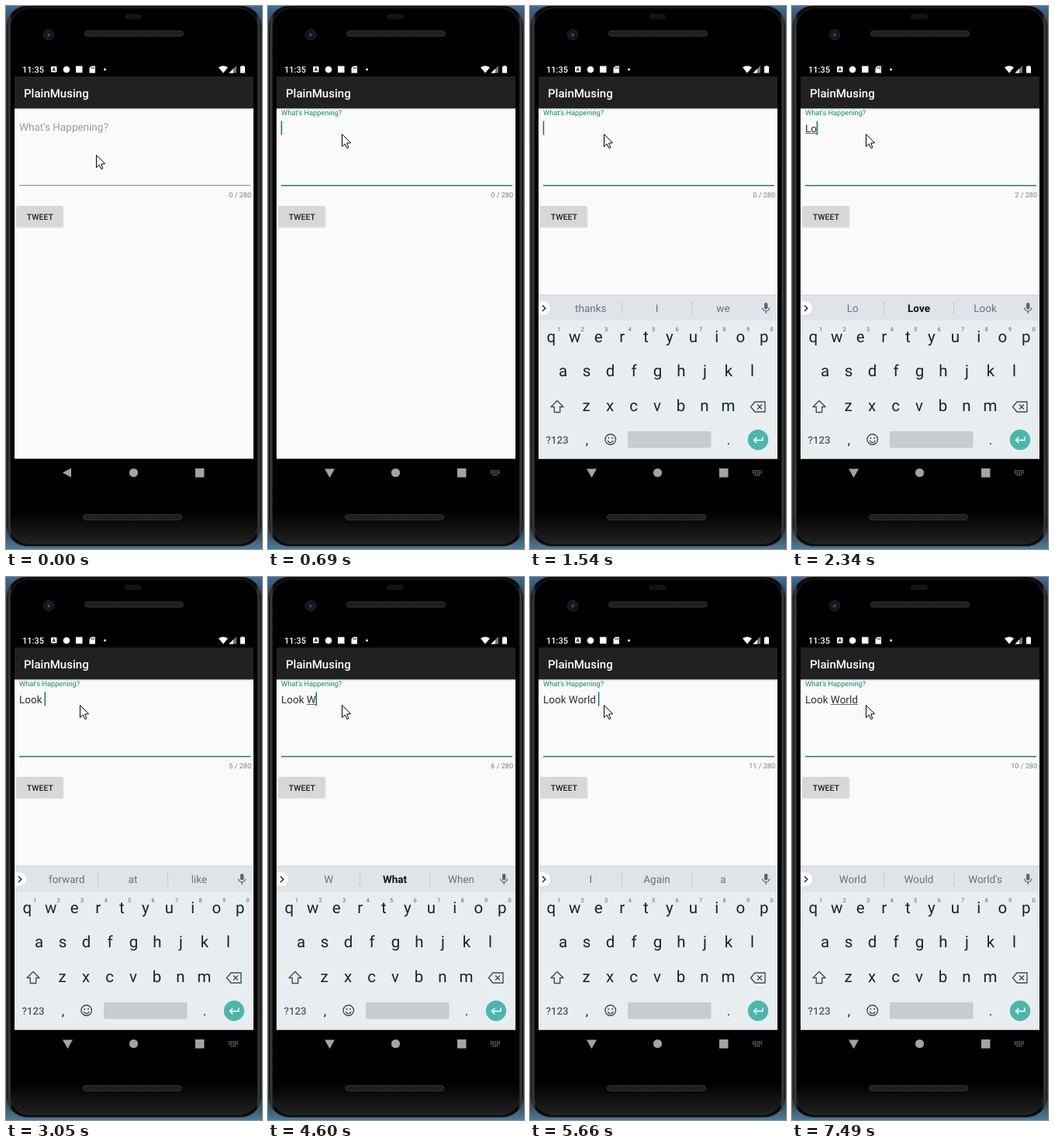
Animation, 330 px wide and 701 px high, one loop 8 s. Source, as an HTML page:

```html
<!DOCTYPE html>
<html lang="en">
<head>
<meta charset="utf-8">
<title>Compose screen</title>
<style>
html, body { margin: 0; width: 100%; height: 100%; overflow: hidden; background: #000; }
svg { display: block; width: 330px; height: 701px; font-family: Roboto, sans-serif; text-rendering: geometricPrecision; }
text { white-space: pre; }
.mid { text-anchor: middle; }
.key { font-size: 20.5px; fill: #14262d; }
.mark { font-size: 17px; fill: #14262d; }
.digit { font-size: 7.5px; fill: #56656b; }
.word { font-size: 13.5px; fill: #6a7378; }
.line { fill: none; stroke: #3f4d53; stroke-width: 1.4; }
</style>
</head>
<body>
<svg viewBox="0 0 330 701">
  <defs>
    <linearGradient id="sky" x2="0" y2="1">
      <stop offset="0" stop-color="#3b6d9c"/><stop offset=".06" stop-color="#25282b"/>
      <stop offset=".95" stop-color="#25282b"/><stop offset="1" stop-color="#4a7d9c"/>
    </linearGradient>
    <linearGradient id="rim">
      <stop offset="0" stop-color="#0c0d0e"/><stop offset=".012" stop-color="#3a3d3f"/>
      <stop offset=".022" stop-color="#0a0a0b"/><stop offset=".978" stop-color="#0a0a0b"/>
      <stop offset=".988" stop-color="#3a3d3f"/><stop offset="1" stop-color="#0c0d0e"/>
    </linearGradient>
    <linearGradient id="glass" x2="0" y2="1">
      <stop offset=".94" stop-color="#000"/><stop offset="1" stop-color="#222"/>
    </linearGradient>
    <pattern id="mesh" width="4" height="4" patternUnits="userSpaceOnUse">
      <rect width="4" height="4" fill="#242424"/><path d="M0 1h2M2 3h2" stroke="#101010"/>
    </pattern>
    <clipPath id="screen"><rect x="11" y="132" width="308" height="452.5"/></clipPath>
  </defs>

  <!-- phone -->
  <rect width="330" height="701" fill="url(#sky)"/>
  <rect x=".5" y="-.5" width="329" height="698" rx="27" fill="url(#rim)" stroke="#404447"/>
  <rect x="5.5" y="2.5" width="319" height="692" rx="25" fill="url(#glass)" stroke="#25272a"/>
  <rect x="153" y="10" width="22" height="7" rx="3.5" fill="#131313"/>
  <circle cx="55" cy="37" r="6.8" fill="#14161b" stroke="#222529"/>
  <circle cx="55" cy="37" r="3.2" fill="#15203a"/>
  <circle cx="55" cy="37.5" r="1.3" fill="#44619c"/>
  <g fill="url(#mesh)" stroke="#333">
    <rect x="101.5" y="32" width="127" height="7" rx="3.5"/>
    <rect x="99.5" y="656.5" width="127" height="7" rx="3.5"/>
  </g>

  <!-- status bar -->
  <g fill="#fff">
    <text x="21" y="86" font-size="11" font-weight="500">11:35</text>
    <rect x="58" y="78" width="7.5" height="7.5" rx="1"/>
    <path d="M60 84l1.7-4.5 1.7 4.5M60.6 82.6h2.2" fill="none" stroke="#000" stroke-width=".9"/>
    <circle cx="78" cy="82" r="4.3"/>
    <rect x="90" y="77.5" width="8.5" height="8.5"/>
    <path d="M110 77.5h5v9h-7.5v-6.5z"/>
    <path d="M110.5 79v2m1.5-2v2m1.5-2v2" stroke="#000" stroke-width=".7"/>
    <circle cx="127.5" cy="82" r="1.4"/>
    <path d="M274 79.3q6-4.3 12 0l-6 7.2z"/>
    <path d="M297 77v9.5h-9.5z" fill="#777"/>
    <path d="M293 81v5.5h-5.5z"/>
    <path d="M302 78h1.6v-1h2.8v1h1.6v8.5h-6z"/>
  </g>

  <!-- app -->
  <rect x="11" y="91" width="308" height="41" fill="#212121"/>
  <text x="23" y="118" font-size="15" font-weight="500" fill="#fff">PlainMusing</text>
  <rect x="11" y="132" width="308" height="452.5" fill="#fafafa"/>
  <path d="M11 132.5h308" stroke="#b0b0b0"/>
  <path d="M11 133.5h308" stroke="#e6e6e6"/>
  <text id="hint" x="17">What's Happening?</text>
  <text id="entry" x="17" y="162.7" font-size="13.5" fill="#303030"></text>
  <path id="composing" stroke="#555" stroke-width=".9"/>
  <rect id="caret" y="148.5" width="1.5" height="18" fill="#0b7a68"/>
  <path id="rule"/>
  <text id="count" x="316" y="247" font-size="9.1" fill="#7d7d7d" text-anchor="end"></text>
  <rect x="13" y="259" width="61.5" height="27.5" rx="1.5" fill="#e3e3e3"/>
  <rect x="13.5" y="258" width="60" height="27" rx="1.5" fill="#d6d7d7"/>
  <text class="mid" x="43.8" y="275.5" font-size="10.5" font-weight="500" fill="#1f1f1f">TWEET</text>

  <!-- keyboard -->
  <g clip-path="url(#screen)"><g id="keyboard">
    <rect x="11" y="372.5" width="308" height="2" fill="#d5d9db"/>
    <rect x="11" y="374" width="308" height="211" fill="#e8edf0"/>
    <rect x="11" y="374" width="308" height="32" fill="#e0e4e8"/>
    <path d="M11 381h6a9 9 0 0 1 0 18h-6z" fill="#fff"/>
    <path d="M16 386.5l3.8 3.7-3.8 3.7" class="line" style="stroke:#222"/>
    <path d="M118.5 381v18M208.5 381v18" stroke="#c5cacd"/>
    <g id="words"></g>
    <rect x="302" y="383" width="4.4" height="8.5" rx="2.2" fill="#5a666c"/>
    <path d="M299.8 389.5a4.4 4.4 0 0 0 8.8 0M304.2 394v3" class="line" style="stroke:#5a666c"/>
    <g id="keys"></g>
    <path d="M35 509.5l8 8h-4.3v7h-7.4v-7h-4.3z" class="line" stroke-linejoin="round"/>
    <path d="M290 511h13v13h-13l-5.5-6.5zM293 514.5l6 6m0-6l-6 6" class="line"/>
    <text class="mid" x="35" y="564.5" font-size="13.3" font-weight="500" fill="#4f5c62">?123</text>
    <text class="mid mark" x="73.5" y="566">,</text>
    <circle cx="103.7" cy="559.5" r="6.8" class="line"/>
    <path d="M100.5 561.5a3.5 3.5 0 0 0 6.4 0" class="line" stroke-linecap="round"/>
    <circle cx="101.4" cy="557.7" r="1" fill="#3f4d53"/><circle cx="106" cy="557.7" r="1" fill="#3f4d53"/>
    <rect x="126" y="549" width="107.5" height="21.5" rx="2" fill="#c8cccf"/>
    <text class="mid mark" x="256" y="566">.</text>
    <circle cx="294" cy="560" r="13.2" fill="#4db6ac"/>
    <path d="M300 556v4.5h-11.5m3.8-3.8l-3.8 3.8 3.8 3.8" class="line" style="stroke:#fff"/>
  </g></g>

  <!-- navigation -->
  <g fill="#a3a3a3">
    <path id="back"/>
    <circle cx="164.5" cy="602.5" r="5.6"/>
    <rect x="244" y="597" width="11.5" height="11.5"/>
    <path id="switcher" d="M287 600.2h12M287 602.8h12M289.5 605.5h7" stroke="#999" stroke-width="1.4" stroke-dasharray="1.4 1.2"/>
  </g>
  <path id="pointer" d="M0 0V16L3.7 12.6 6.3 18 8.4 17.2 6.1 11.6 11 11.2z" fill="#fff" stroke="#000" stroke-linejoin="round"/>
</svg>
<script>
const $ = id => document.getElementById(id);
const LOOP = 8000, LEFT = 17;

const label = (cls, x, y, text = '') =>
  `<text class="mid ${cls}" x="${x}" y="${y}">${text}</text>`;
const row = (cls, chars, x, y) =>
  [...chars].map((c, i) => label(cls, x + i * 30.5, y, c)).join('');

$('keys').innerHTML = row('key', 'qwertyuiop', 27.3, 434.3) + row('key', 'asdfghjkl', 42.5, 478.3) +
  row('key', 'zxcvbnm', 72.5, 522.6) + row('digit', '1234567890', 37, 419.5);
$('words').innerHTML = [78.3, 163.5, 249].map(x => label('word', x, 395)).join('');
const slots = [...$('words').children];

// float: hint position 0..1, kb: keyboard visibility 0..1, mark: start of the composing word
const start = {
  at: [116.5, 192.5], float: 0, focus: false, caret: false, nav: false, kb: 0,
  text: '', mark: -1, words: ['thanks', 'I', 'we'], bold: false
};
const type = (text, mark, words, bold = false) =>
  ({ text, mark, words: words.split(' '), bold, caret: true });
const off = { caret: false }, on = { caret: true };

const steps = [
  [150, { at: [109, 183] }],
  [270, { at: [98.5, 171.5] }],
  [420, { at: [95.5, 165.5] }],
  [540, { focus: true, caret: true, float: .12 }],
  [690, { float: 1, nav: true }],
  [840, { kb: .75 }],
  [960, { kb: 1 }],
  [1110, off], [1540, on], [2100, off],
  [2220, type('L', 0, 'L Let Love', true)],
  [2340, type('Lo', 0, 'Lo Love Look', true)],
  [2460, type('Loo', 0, 'Loo Look Looks', true)],
  [2740, type('Look', 0, 'Look Looked Looks')],
  [3050, type('Look ', -1, 'forward at like')],
  [3610, off], [4070, on],
  [4600, type('Look W', 5, 'W What When', true)],
  [4720, type('Look Wo', 5, 'Wo Work Would', true)],
  [4870, type('Look Wor', 5, 'Wor Work Worth', true)],
  [4990, type('Look Worl', 5, 'Worl World Worlds', true)],
  [5140, type('Look World', 5, "World Would World's")],
  [5540, { text: 'Look World ', mark: -1 }],
  [5660, { words: ['I', 'Again', 'a'] }],
  [6220, off], [6650, on],
  [7060, { text: 'Look World', mark: 5 }],
  [7210, { words: ['World', 'Would', "World's"] }],
  [7490, off]
];

const pen = document.createElement('canvas').getContext('2d');
function widthOf(text) {
  pen.font = '13.5px Roboto, sans-serif';
  pen.textRendering = 'geometricPrecision';
  return pen.measureText(text).width;
}
function set(id, attrs) {
  for (const name in attrs) $(id).setAttribute(name, attrs[name]);
}

function draw(t) {
  const s = Object.assign({}, start, ...steps.filter(([time]) => time <= t).map(step => step[1]));
  const end = LEFT + widthOf(s.text);

  set('pointer', { transform: `translate(${s.at})` });
  set('hint', {
    y: 161 - 19.8 * s.float, 'font-size': 13.5 - 4.3 * s.float,
    fill: s.focus ? '#128a76' : '#9b9b9b'
  });
  set('rule', s.focus
    ? { d: 'M17 231.75h298', stroke: '#24806f', 'stroke-width': 1.5 }
    : { d: 'M17 231.5h298', stroke: '#8c8c8c', 'stroke-width': 1 });
  set('caret', { x: end - .3, opacity: +s.caret });
  set('composing', { d: s.mark < 0 ? '' : `M${LEFT + widthOf(s.text.slice(0, s.mark))} 164.5H${end}` });
  $('entry').textContent = s.text;
  $('count').textContent = `${s.text.length} / 280`;

  slots.forEach((slot, i) => {
    const strong = s.bold && i === 1;
    slot.textContent = s.words[i];
    slot.style.fontWeight = strong ? 700 : 400;
    slot.style.fill = strong ? '#111' : '';
  });
  set('keyboard', { transform: `translate(0 ${(1 - s.kb) * 160})`, opacity: s.kb });
  set('back', { d: s.nav ? 'M73 597.5h13l-6.5 11.5z' : 'M73 602.5l11-6v12z' });
  set('switcher', { opacity: +s.nav });
}

function tick(now) {
  draw(now % LOOP);
  requestAnimationFrame(tick);
}
draw(0);
requestAnimationFrame(tick);
</script>
</body>
</html>
```
